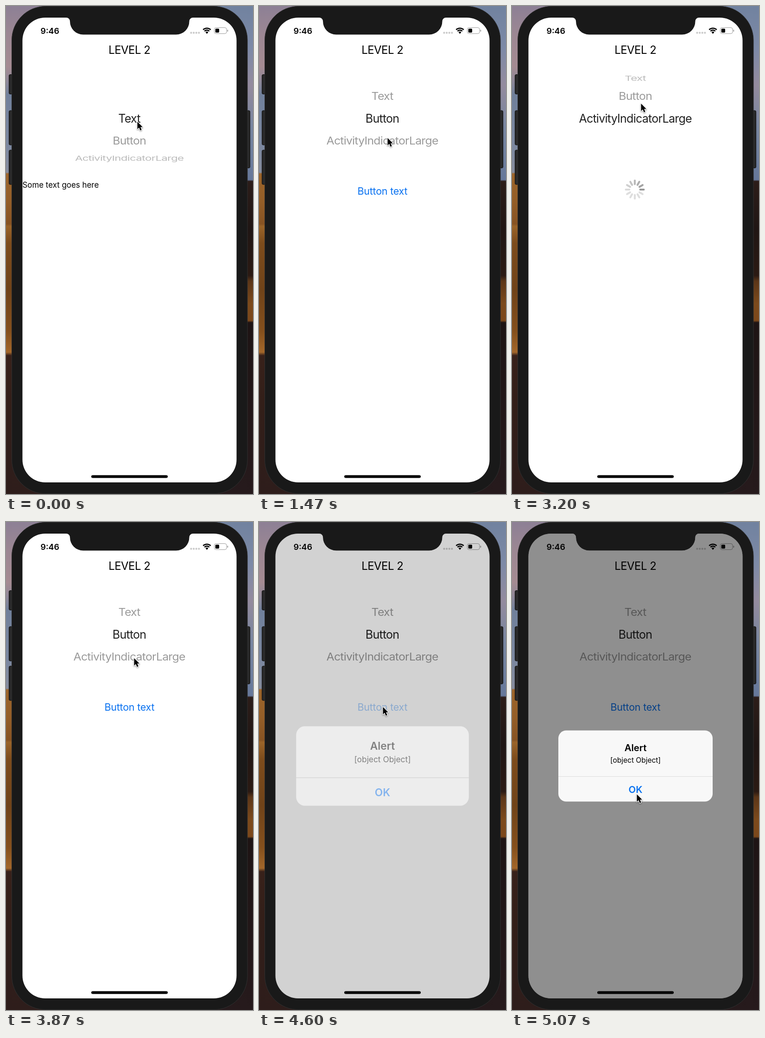
Animation of 533 by 1050 pixels, one loop 5.14 s. Source, as an HTML page with a canvas:

```html
<!DOCTYPE html>
<html lang="en">
<head>
<meta charset="utf-8">
<title>Component picker</title>
<style>
  html, body { margin: 0; width: 100%; height: 100%; overflow: hidden; background: #191919; }
  canvas { display: block; }
</style>
</head>
<body>
<canvas id="stage" width="533" height="1050"></canvas>
<script>
const ctx = document.getElementById('stage').getContext('2d');
const LOOP = 5140, MID = 266.5, BLUE = '#0a72f0';
const ROWS = ['Text', 'Button', 'ActivityIndicatorLarge'];
const WHEEL = { y: 242, radius: 106.6, step: 0.469, band: 20 };

// Keys are [time, value, ...]; eased between neighbours.
const POINTER = [[0, 283, 249], [560, 283, 249], [880, 277, 284], [2660, 277, 284], [3050, 278, 210],
  [3560, 278, 210], [3870, 276, 293], [4200, 267, 398], [4640, 267, 398], [4960, 269, 586]];
const SELECTED = [[930, 0], [1240, 1], [2340, 1], [2620, 2], [3250, 2], [3560, 1]];
const PRESS = [[4330, 1], [4440, 0.2], [4530, 0.2], [4780, 1]];
const BUTTON_AT = 1250, SPINNER_AT = 2650, BUTTON_AGAIN = 3600, ALERT_AT = 4540;

const clamp = v => Math.max(0, Math.min(1, v));

function track(keys, t) {
  const i = keys.findIndex(k => k[0] > t);
  if (i < 0) return keys[keys.length - 1].slice(1);
  if (i === 0) return keys[0].slice(1);
  const a = keys[i - 1], b = keys[i];
  const u = (t - a[0]) / (b[0] - a[0]), e = u * u * (3 - 2 * u);
  return a.slice(1).map((v, n) => v + (b[n + 1] - v) * e);
}

// y is the middle of the capitals; centring ignores the trailing letter space.
function text(str, x, y, size, { color = '#000', weight = 400, spacing = 0, align = 'center' } = {}) {
  ctx.font = `${weight} ${size}px Inter, sans-serif`;
  ctx.letterSpacing = `${spacing * size}px`;
  ctx.textAlign = align;
  ctx.fillStyle = color;
  ctx.fillText(str, x + (align === 'center' ? spacing * size / 2 : 0), y + size * 0.364);
}

function box(x, y, w, h, r, fill, stroke) {
  ctx.beginPath();
  ctx.roundRect(x, y, w, h, r);
  if (fill) { ctx.fillStyle = fill; ctx.fill(); }
  if (stroke) { ctx.strokeStyle = stroke; ctx.lineWidth = 1; ctx.stroke(); }
}

function strip(x, w, stops) {
  const g = ctx.createLinearGradient(0, 0, 0, 1050);
  for (const [y, color] of stops) g.addColorStop(y / 1050, color);
  ctx.fillStyle = g;
  ctx.fillRect(x, 0, w, 1050);
}

const screen = new Path2D(`M84.500 25H130A8 8 0 0 1 138 33A28.500 28.500 0 0 0 166.500 61.500H367
  A28.500 28.500 0 0 0 395.500 33A8 8 0 0 1 403.500 25H448.500A49 49 0 0 1 497.500 74V976
  A49 49 0 0 1 448.500 1025H84.500A49 49 0 0 1 35.500 976V74A49 49 0 0 1 84.500 25Z`);
const arrow = new Path2D('M0 0V16L3.700 12.600L6.200 18.700L9.100 17.500L6.600 11.600H11.400Z');

function phone() {
  strip(0, 266, [[0, '#8d8095'], [60, '#9c8793'], [130, '#a58b92'], [160, '#8f8797'], [190, '#70809b'],
    [300, '#7b879f'], [358, '#858b9c'], [361, '#9b642a'], [420, '#945e28'], [469, '#875323'],
    [474, '#9a6429'], [510, '#7d4c1c'], [610, '#704319'], [700, '#85501d'], [745, '#a3672a'],
    [752, '#38211a'], [850, '#331f19'], [1050, '#2e1d1b']]);
  strip(266, 267, [[0, '#71829f'], [90, '#7d8aa7'], [170, '#948b9e'], [260, '#77859f'], [374, '#66789a'],
    [377, '#2c1d19'], [480, '#201614'], [580, '#2b1a13'], [592, '#5c3618'], [640, '#7c4a1c'],
    [677, '#7c481b'], [681, '#1e1414'], [1050, '#261a1c']]);
  for (const [x, y, h] of [[6.5, 147.5, 42], [6.5, 225, 74], [6.5, 310, 74], [516.5, 225, 123.5]])
    box(x, y, 10, h, 2.5, '#292929', '#0c0c0c');
  box(12.5, 0.5, 508.5, 1049, 73, '#191919', '#303030');
  ctx.fillStyle = '#fff';
  ctx.fill(screen);
}

function statusBar() {
  text('9:46', 94.7, 53.5, 17.9, { weight: 600 });
  ctx.fillStyle = '#c9c9c9';
  for (let i = 0; i < 4; i++) {
    ctx.beginPath();
    ctx.arc(399.5 + i * 5.6, 57.7, 2.1, 0, 7);
    ctx.fill();
  }
  ctx.strokeStyle = '#000';
  ctx.lineWidth = 2.6;
  for (const r of [7.4, 11.5]) {
    ctx.beginPath();
    ctx.arc(433.5, 59.3, r, -Math.PI * 0.75, -Math.PI * 0.25);
    ctx.stroke();
  }
  ctx.fillStyle = '#000';
  ctx.beginPath();
  ctx.moveTo(433.5, 60);
  ctx.arc(433.5, 59.3, 4.3, -Math.PI * 0.75, -Math.PI * 0.25);
  ctx.fill();
  box(449.5, 46.5, 26.5, 13, 3.8, null, '#9a9a9a');
  box(451.7, 48.7, 8.3, 8.6, 1.8, '#000');
  box(477.5, 51, 1.7, 4.2, 1, '#9a9a9a');
}

function picker(selected) {
  const drawRows = (top, height, dark) => {
    ctx.save();
    ctx.beginPath();
    ctx.rect(36, top, 461, height);
    ctx.clip();
    ROWS.forEach((label, i) => {
      const angle = (i - selected) * WHEEL.step, depth = Math.cos(angle);
      ctx.save();
      ctx.translate(MID, WHEEL.y + WHEEL.radius * Math.sin(angle));
      ctx.scale(1 - 0.09 * (1 - depth), depth);
      ctx.globalAlpha = dark ? 0.87 : 0.45 * depth;
      text(label, 0, 0, 25, { spacing: -0.03 });
      ctx.restore();
    });
    ctx.restore();
  };
  const top = WHEEL.y - WHEEL.band, bottom = WHEEL.y + WHEEL.band;
  drawRows(120, top - 120, false);
  drawRows(top, bottom - top, true);
  drawRows(bottom, 110, false);
}

function spinner(elapsed) {
  const head = 9 + Math.floor((elapsed + 20) / 1000 * 12);
  ctx.lineWidth = 4.2;
  ctx.lineCap = 'round';
  for (let i = 0; i < 12; i++) {
    const age = (head - i) % 12;
    const visited = head - age >= 9;
    const shade = visited ? Math.min(222, 152 + age * 11) : 222;
    const a = (i - 3) * Math.PI / 6, c = Math.cos(a), s = Math.sin(a);
    ctx.strokeStyle = `rgb(${shade},${shade},${shade})`;
    ctx.beginPath();
    ctx.moveTo(265 + 11.7 * c, 395 + 11.7 * s);
    ctx.lineTo(265 + 19.4 * c, 395 + 19.4 * s);
    ctx.stroke();
  }
  ctx.lineCap = 'butt';
}

function content(t) {
  if (t < BUTTON_AT) {
    text('Some text goes here', 35.5, 385, 16.9, { align: 'left' });
  } else if (t >= SPINNER_AT && t < BUTTON_AGAIN) {
    spinner(t - SPINNER_AT);
  } else {
    ctx.globalAlpha = track(PRESS, t)[0];
    text('Button text', MID, 398.5, 21.5, { color: BLUE, spacing: -0.01 });
    ctx.globalAlpha = 1;
  }
}

function alertBox(elapsed) {
  if (elapsed <= 0) return;
  const w = elapsed * 0.0228, p = 1 - (1 + w) * Math.exp(-w);
  ctx.fillStyle = `rgba(0,0,0,${0.44 * p})`;
  ctx.fill(screen);
  ctx.save();
  ctx.translate(MID, 525);
  ctx.scale(1.2 - 0.2 * p, 1.2 - 0.2 * p);
  ctx.globalAlpha = clamp(p * 1.75);
  box(-166.5, -76.5, 333, 153, 17, '#f8f8f8');
  ctx.fillStyle = `rgba(0,0,0,${0.22 - 0.11 * p})`;
  ctx.fillRect(-166.5, 22, 333, 1);
  ctx.globalAlpha = clamp(p * 1.12);
  text('Alert', 0, -39, 20.3, { weight: 600 });
  text('[object Object]', 0, -13, 15.5);
  text('OK', 0, 50.5, 20.3, { weight: 600, color: BLUE });
  ctx.restore();
}

function pointer(t) {
  const [x, y] = track(POINTER, t);
  ctx.save();
  ctx.translate(x + 0.5, y);
  ctx.lineJoin = 'round';
  ctx.lineWidth = 2.2;
  ctx.strokeStyle = '#fff';
  ctx.shadowColor = 'rgba(0,0,0,.4)';
  ctx.shadowBlur = 3;
  ctx.shadowOffsetY = 1.5;
  ctx.stroke(arrow);
  ctx.shadowColor = 'transparent';
  ctx.fillStyle = '#000';
  ctx.fill(arrow);
  ctx.restore();
}

function draw() {
  const t = performance.now() % LOOP;
  phone();
  statusBar();
  text('LEVEL 2', MID, 94.5, 23.9, { spacing: -0.02 });
  picker(track(SELECTED, t)[0]);
  content(t);
  box(184, 1009.5, 165, 6, 3, '#000');
  alertBox(t - ALERT_AT);
  pointer(t);
  requestAnimationFrame(draw);
}
draw();
</script>
</body>
</html>
```
